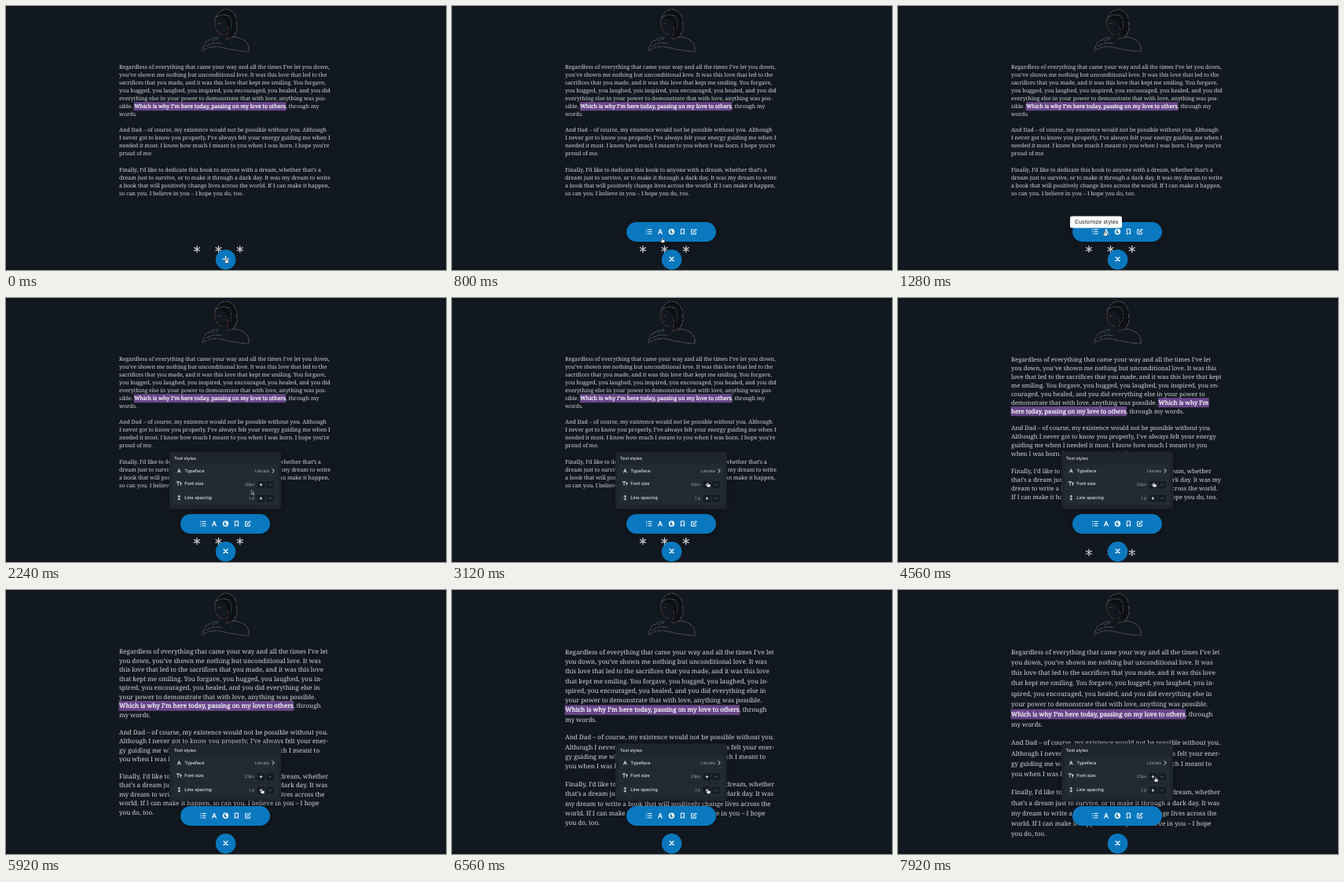
An HTML page that plays this animation: 560x336 px, repeating every 8 s.

```html
<!DOCTYPE html>
<html lang="en">
<head>
<meta charset="utf-8">
<title>Reader text styles</title>
<style>
  html, body { margin: 0; width: 560px; height: 336px; overflow: hidden; background: #12181f; }
  svg { display: block; }
  text { white-space: pre; text-rendering: geometricPrecision; }
  #page text { font-family: "Noto Serif", serif; fill: #d6d8db; }
  #page .strong { fill: #fff; stroke: #fff; stroke-width: .24px; }
  #panel, #menu { filter: drop-shadow(0 1px 4px rgba(0, 0, 0, .3)); }
  .ui text { font: 500 5.7px Inter, sans-serif; fill: #e4e7eb; }
  .ui .value { font-size: 5.2px; font-weight: 400; fill: #a3a9b2; text-anchor: end; }
  .line { fill: none; stroke: #fff; stroke-linecap: round; stroke-linejoin: round; }
</style>
</head>
<body>
<svg width="560" height="336" viewBox="0 0 560 336">
  <rect width="560" height="336" fill="#12181f"/>

  <g id="portrait" fill="none" stroke="#858a8e" stroke-width=".55" stroke-linecap="round">
    <path fill="#0d0f13" stroke="none" d="M268 15Q272 4 282 4Q291 6 293 17Q296 28 290 38Q284 40 281 33Q284 24 279 18Q273 15 268 15Z"/>
    <path stroke-dasharray="6 2 3 1.5" d="M266 17Q270 5 280 4Q290 5 293 16M268 14Q276 9 284 13M293 20Q296 30 290 38M288 39Q300 40 306 46Q310 51 309 58M250 57Q262 49 276 53Q292 57 309 58M250 55L254 46L263 41L270 40M255 51Q264 45 275 48"/>
    <path stroke="#96534b" stroke-dasharray="4 2" d="M266 18Q265 26 269 32Q272 37 277 36M269 23L273 22M282 27Q284 33 281 37M280 42L289 40"/>
    <path stroke="#52728a" stroke-dasharray="3 2" d="M285 14Q288 21 286 30M262 44L270 42"/>
  </g>

  <g id="page"></g>
  <g id="stars" class="line" stroke-width="1.25" style="stroke:#d6d8db"></g>

  <g id="panel" class="ui">
    <rect x="208" y="195.5" width="142" height="73" rx="3.5" fill="#1e252f"/>
    <g fill="#222a34">
      <rect x="212" y="211.5" width="134" height="16.8" rx="2"/>
      <rect x="212" y="229" width="134" height="16.5"/>
      <rect x="212" y="246.2" width="134" height="16.8" rx="2"/>
    </g>
    <text x="214" y="206.2" style="font-size:5.4px">Text styles</text>
    <text x="227.3" y="221.9">Typeface</text>
    <text x="227.3" y="238.3">Font size</text>
    <text x="227.3" y="256.3">Line spacing</text>
    <text x="335" y="222" class="value">Literata</text>
    <text id="sizeValue" x="316" y="239.4" class="value"></text>
    <text id="leadValue" x="316" y="256.6" class="value"></text>
    <path class="line" d="M339 217.7l2.3 2.3l-2.3 2.3" stroke-width=".9"/>
    <g class="line" stroke-width=".8">
      <path d="M218.5 222.1l1.8-4.4l1.8 4.4M219.2 220.8h2.2"/>
      <path d="M217 234h4M219 234v4.4M221.5 235.4h2M222.5 235.4v3"/>
      <path d="M220.3 251.5v5.4M218.9 252.8l1.4-1.5l1.4 1.5M218.9 255.6l1.4 1.5l1.4-1.5"/>
    </g>
    <g id="steppers"></g>
  </g>

  <g id="menu">
    <rect x="222" y="275" width="114" height="25" rx="12.5" fill="#0a78be"/>
    <g class="line" stroke-width="1">
      <path d="M250 284.5h4M250 287.2h4M250 289.9h4M247.6 284.5h.4M247.6 287.2h.4M247.6 289.9h.4"/>
      <path d="M262.6 290.2l2.4-6l2.4 6M263.5 288.3h3" stroke-width="1.1"/>
      <path d="M291.7 284h3.8v6.4l-1.9-1.6l-1.9 1.6z"/>
      <path d="M307 284.6h-2.3v5.7h5.6v-2.2M307 288l.3-1.4l3-3l1 1l-3 3z"/>
    </g>
    <circle cx="279.5" cy="287.2" r="3.7" fill="#fff"/>
    <path d="M280 284.8a2.4 2.4 0 1 0 1.7 3.8a2.3 2.3 0 0 1-1.7-3.8" fill="#0a78be"/>
  </g>

  <g id="tooltip">
    <rect x="219" y="267.6" width="66" height="15" rx="2.5" fill="#fff"/>
    <text x="225" y="277.4" font-family="Inter, sans-serif" font-size="6.85" fill="#11161c">Customize styles</text>
  </g>

  <circle cx="279.6" cy="322.8" r="12.8" fill="#0a78be"/>
  <path id="cross" class="line" d="M-3.5 0h7M0-3.5v7" stroke-width="1.4"/>

  <g id="cursor" stroke="#10151b" stroke-width=".5" stroke-linejoin="round">
    <path id="hand" fill="#fff" d="M-.8-2.6q.7-.8 1.3 0v1.8l2 .5q.8.3.6 1.2l-.6 2.3h-3.4l-2-2.4q.2-1 1.2-.4l.9.7z"/>
    <path id="arrow" fill="#10151b" stroke="#fff" d="M-1.5-3v5.2l1.3-1.2l1 2.1l.9-.4l-1-2h1.7z"/>
  </g>
</svg>

<script>
const LOOP = 8000;
const PX = 0.357;           // stage pixels per reader pixel
const LEFT = 144, TOP = 72.7, PARAGRAPH_GAP = 10.4;
const STARS_BELOW_TEXT = 71;

// Digits mark where the line breaks: 0 at 20px, 1 at 21px, 2 at 22px, 3 at 23px.
const PARAGRAPHS = [
  "Regardless of everything that came your way and all the times I’ve let 23you 1down, 0you’ve shown me nothing but unconditional love. It was 3this 2love that 1led to the 0sacrifices that you made, and it was this love 3that kept 2me smiling. 1You forgave, 0you hugged, you laughed, you in-3spired, you en-2couraged, you 1healed, and you did 0everything else in 3your power to 2demonstrate that with 1love, anything was pos-0sible. 3<Which is why I’m 2here today, passing on my 1love to others>, through 3my 0words.",
  "And Dad – of course, my existence would not be possible without you. 123Although 0I never got to know you properly, I’ve always felt your ener-3gy 2guid-1ing me when I 0needed it most. I know how much I meant to 3you 2when I was 1born. I hope you’re 0proud of me.",
  "Finally, I’d like to dedicate this book to anyone with a dream, whether 23that’s a 01dream just to survive, or to make it through a dark day. It was 3my 2dream to 1write 0a book that will positively change lives across the 3world. 2If I can make 1it happen, 0so can you. I believe in you – I hope 3you do, too.",
];

// [start, font size, line spacing]
const SETTINGS = [
  [0, 20, 1.4], [3200, 21, 1.4], [3920, 22, 1.4],
  [4720, 23, 1.4], [6240, 23, 1.5], [6960, 23, 1.6],
];

// [start, end, x, y]
const MOVES = [
  [480, 1120, 263.5, 289.5],
  [1840, 2560, 326, 237.5],
  [5600, 5920, 326, 256],
  [7600, 7920, 328, 241],
];

const $ = id => document.getElementById(id);
const clamp = x => Math.min(1, Math.max(0, x));
const easeOut = x => 1 - (1 - x) ** 2;
const progress = (t, start, end) => easeOut(clamp((t - start) / (end - start)));

function add(parent, tag, attrs = {}) {
  const node = document.createElementNS("http://www.w3.org/2000/svg", tag);
  for (const name in attrs) node.setAttribute(name, attrs[name]);
  return parent.appendChild(node);
}

const breakLines = (paragraph, layout) => paragraph
  .replace(/(-?)(\d+)/g, (_, hyphen, ids) => ids.includes(layout) ? hyphen + "\n" : "")
  .split("\n").map(line => line.trim());

// Body size chosen so the opening line measures 268px at the 20px setting.
const pen = document.createElement("canvas").getContext("2d");
pen.font = '100px "Noto Serif", serif';
const bodyScale = 268 / pen.measureText(breakLines(PARAGRAPHS[0], 0)[0]).width * 100 / 20;

function typeset(size, lead) {
  const page = $("page"), em = size * PX, lineHeight = em * lead;
  let y = TOP, middle, strong = false;
  page.replaceChildren();
  for (const paragraph of PARAGRAPHS) {
    for (const line of breakLines(paragraph, size - 20)) {
      middle = y + lineHeight / 2;
      const text = add(page, "text", { x: LEFT, y: middle + em * 0.33, "font-size": size * bodyScale });
      for (const part of line.split(/([<>])/)) {
        if (part === "<" || part === ">") strong = part === "<";
        else if (part) {
          const span = add(text, "tspan", strong ? { class: "strong" } : {});
          span.textContent = part;
          if (strong) highlight(span, text, middle, em * 1.55);
        }
      }
      y += lineHeight;
    }
    y += PARAGRAPH_GAP;
  }
  $("stars").setAttribute("transform", `translate(0 ${middle + STARS_BELOW_TEXT})`);
  $("sizeValue").textContent = size + "px";
  $("leadValue").textContent = lead.toFixed(1);
}

function highlight(span, text, middle, height) {
  const x = span.getStartPositionOfChar(0).x;
  const rect = add($("page"), "rect", {
    x: x - 0.5, y: middle - height / 2, width: span.getComputedTextLength() + 1, height, fill: "#674688",
  });
  text.before(rect);
}

for (const x of [243, 270.5, 297.8])
  add($("stars"), "path", { d: `M${x}-4v8M${x - 3.5}-2l7 4M${x - 3.5} 2l7-4` });

for (const y of [237.7, 255])
  for (const [x, sign] of [[324.5, "M-1.5 0h3M0-1.5v3"], [336, "M-1.2 0h2.4"]]) {
    const button = add($("steppers"), "g", { transform: `translate(${x} ${y})` });
    add(button, "rect", { x: -5, y: -4.8, width: 10, height: 9.6, rx: 1.5, fill: "#161c25" });
    add(button, "path", { d: sign, class: "line", "stroke-width": 0.8, opacity: x < 330 ? 1 : 0.4 });
  }

function cursorAt(t) {
  let x = 280.5, y = 324;
  for (const [start, end, toX, toY] of MOVES) {
    const p = progress(t, start, end);
    x += (toX - x) * p;
    y += (toY - y) * p;
  }
  return [x, y];
}

let current = null;
function render(t) {
  const setting = SETTINGS.findLast(([start]) => t >= start);
  if (setting !== current) {
    current = setting;
    typeset(setting[1], setting[2]);
  }

  const open = progress(t, 320, 600);
  $("menu").setAttribute("opacity", open);
  $("menu").setAttribute("transform", `translate(0 ${8 * (1 - open)})`);
  $("cross").setAttribute("transform", `translate(279.6 322.1) rotate(${45 * open})`);
  $("tooltip").setAttribute("opacity", progress(t, 1040, 1200) * (1 - progress(t, 1840, 1960)));
  $("panel").setAttribute("opacity", progress(t, 1640, 1840));

  const travelling = t > 1920 && t < 2400;
  $("hand").setAttribute("display", travelling ? "none" : "inline");
  $("arrow").setAttribute("display", travelling ? "inline" : "none");
  $("cursor").setAttribute("transform", `translate(${cursorAt(t)})`);
}

const begin = performance.now();
function tick() {
  render((performance.now() - begin) % LOOP);
  requestAnimationFrame(tick);
}
tick();
</script>
</body>
</html>
```
